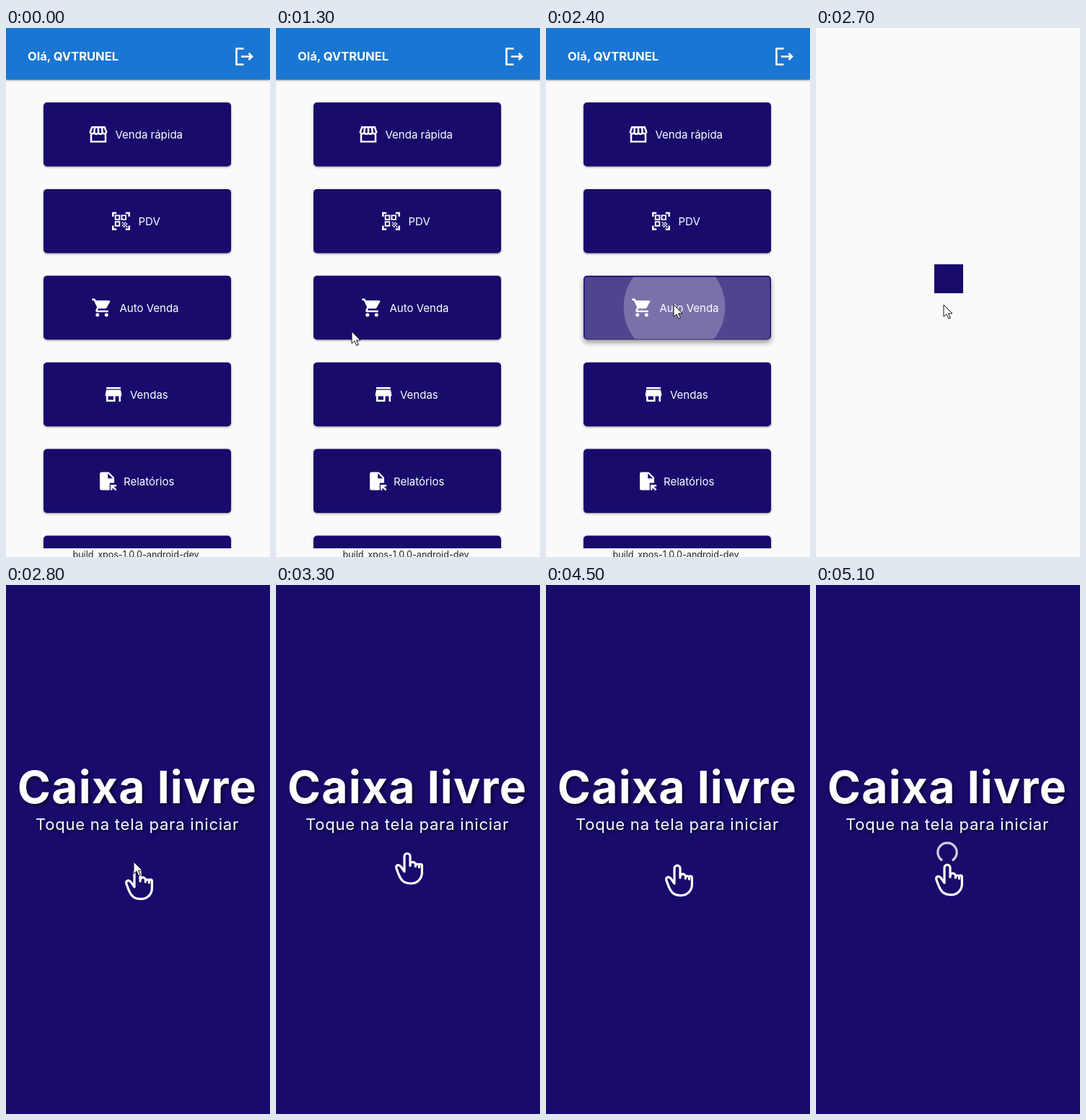
Recreate the animation shown at these times as an HTML page. Size 366 by 732 pixels, loop 5.2 s.

```html
<!DOCTYPE html>
<html lang="pt">
<head>
<meta charset="utf-8">
<title>Caixa livre</title>
<style>
  html, body { margin: 0; height: 100%; overflow: hidden; background: #fafafa; }
  svg { display: block; width: 100vw; height: 100vh; }
  text { font: 15px Inter, "Open Sans", sans-serif; fill: #fff; }
  .btn { fill: #180b6c; filter: drop-shadow(0 1.5px 1.5px #0006); }
  .icon { fill: #fff; }
  .line { fill: none; stroke: #fff; stroke-width: 2; }
  .round { stroke-linecap: round; stroke-linejoin: round; }
  .shade { filter: drop-shadow(2px 2px 2px #000a); }
</style>
</head>
<body>
<svg viewBox="0 0 366 732">
  <clipPath id="inner"><rect x="53.5" y="344.5" width="257" height="86" rx="3"/></clipPath>

  <g id="menu">
    <rect width="366" height="732" fill="#fafafa"/>
    <g id="buttons"></g>
    <g clip-path="url(#inner)" fill="#fff">
      <rect id="glow" x="52" y="343" width="260" height="89"/>
      <circle id="ripple" cx="178" cy="386" fill-opacity=".24"/>
    </g>
    <g id="labels"></g>
    <rect y="720" width="366" height="12" fill="#fafafa"/>
    <text x="180" y="733" text-anchor="middle" style="font-size:12.6px;fill:#222">build_xpos-1.0.0-android-dev</text>
    <rect width="366" height="71.5" fill="#1976d2" style="filter:drop-shadow(0 1px 1px #0006)"/>
    <text x="30" y="45" style="font-size:16.5px;font-weight:700">Olá, QVTRUNEL</text>
    <path class="line" style="stroke-width:2.6" d="M329.5 28.5H319.5V50.5H329.5M326 39.5H341M336.5 35l4.5 4.5-4.5 4.5"/>
  </g>

  <g id="splash">
    <rect width="366" height="732" fill="#fafafa"/>
    <rect x="164" y="327" width="40" height="40" fill="#180b6c"/>
  </g>

  <g id="idle">
    <rect width="366" height="732" fill="#180b6c"/>
    <g class="shade" text-anchor="middle">
      <text x="182" y="302" style="font-size:62.5px;font-weight:700;letter-spacing:1.2px">Caixa livre</text>
      <text x="182" y="339" style="font-size:22px;letter-spacing:.8px">Toque na tela para iniciar</text>
    </g>
    <path id="ring" class="line"/>
    <path id="hand" class="line round" style="stroke-width:3.2" d="M178 27V6a4 4 0 0 1 8 0V19
      M186 17.5a3.7 3.7 0 0 1 7.4 0V20M193.4 18a3 3 0 0 1 5 0V21
      M198.4 19a2 2.2 0 0 1 4 0V28C202.4 37 196 43.5 187 43.5C178 43.5 174 40 170.5 32L167 23C165.5 18 170 16.5 173 20L178 27"/>
  </g>

  <path id="cursor" d="M0 0V16.5L4 13l2.7 6.3 2.6-1.1L6.6 12H12z" fill="#fff" stroke="#111" stroke-linejoin="round"/>
</svg>

<script>
const LOOP = 5200, TAP = 1400, FIRST_TAP = 3300;
const $ = id => document.getElementById(id);
const set = (id, attrs) => { for (const k in attrs) $(id).setAttribute(k, attrs[k]); };
const show = (id, on) => { $(id).style.display = on ? '' : 'none'; };
const clamp = v => Math.max(0, Math.min(1, v));
const span = (t, a, b) => clamp((t - a) / (b - a));
const mix = (a, b, p) => a + (b - a) * p;
const smooth = p => p * p * (3 - 2 * p);

const square = (x, y, s) => `M${x} ${y}h${s}v${s}h${-s}z`;
const bits = [[0, 0], [2, 0], [1, 1], [3, 1], [0, 2], [2, 2], [1, 3], [3, 3]];
const icons = {
  shop: `<path class="line" d="M4 12V20H20V12M5 4H19L21 9.5a2.4 2.4 0 0 1-4.5.2 2.3 2.3 0 0 1-4.5 0 2.3 2.3 0 0 1-4.5 0A2.4 2.4 0 0 1 3 9.5zM8 4l-.5 5.7M12 4v5.7M16 4l.5 5.7"/>`,
  scan: `<path class="line" d="M3 7V3h4M17 3h4v4M21 17v4h-4M7 21H3v-4"/>
    <path class="line" style="stroke-width:1.5" d="${[[6, 6], [13, 6], [6, 13]].map(([x, y]) => square(x - .25, y - .25, 4.5)).join('')}"/>
    <path class="icon" d="${bits.map(([x, y]) => square(13 + x * 1.5, 13 + y * 1.5, 1.5)).join('')}"/>`,
  cart: `<path class="icon" d="M1 2v2h2l3.6 7.6-1.35 2.45C4.5 15.4 5.5 17 7 17h12v-2H7.4q-.3 0-.2-.4l.9-1.6h7.45q1.2 0 1.75-1l3.6-6.5Q21.5 4 20 4H5.2l-.95-2z"/>
    <circle class="icon" cx="7" cy="20" r="2"/><circle class="icon" cx="17" cy="20" r="2"/>`,
  store: `<path class="icon" d="M20 4H4v2h16zM21 14v-2l-1-5H4l-1 5v2h1v6h10v-6h4v6h2v-6zM12 18H6v-4h6z" fill-rule="evenodd"/>`,
  report: `<path class="icon" fill-rule="evenodd" d="M14 2H6a2 2 0 0 0-2 2v16a2 2 0 0 0 2 2h9v-8h5V8zM13 9V3.5L18.5 9z"/>
    <path class="icon" d="M16 16h6.5v2h-3l3.3 3.3-1.4 1.4L18 19.4V22h-2z"/>`
};

// label, text x, icon, icon x
const items = [
  ['Venda rápida', 151.5, 'shop', 113], ['PDV', 183.5, 'scan', 144.5],
  ['Auto Venda', 157.5, 'cart', 118], ['Vendas', 172, 'store', 134],
  ['Relatórios', 163, 'report', 125], []
];
items.forEach(([label, x, icon, iconX], i) => {
  const y = 103 + i * 119.9;
  $('buttons').innerHTML += `<rect class="btn" x="52" y="${y}" width="260" height="88.5" rx="5"/>`;
  if (label) $('labels').innerHTML +=
    `<g transform="translate(${iconX} ${y + 29.3}) scale(1.25)">${icons[icon]}</g><text x="${x}" y="${y + 50}">${label}</text>`;
});
const pressed = $('buttons').children[2];

function drawMenu(t) {
  const press = span(t, 1880, 2080), r = t < 2450 ? (t - 1890) * .138 : 105;
  set('glow', { 'fill-opacity': .24 * press });
  set('ripple', { r: Math.max(0, r) });
  pressed.style.filter = press ? `drop-shadow(0 ${1.5 + 3 * press}px ${1.5 + 2 * press}px #0006)` : '';
}

function drawCursor(t) {
  const p = smooth(span(t, 1300, 1800));
  const x = mix(105, 177, p), y = mix(420, 383, p) - 85 * p * p * (1 - p);
  set('cursor', { transform: `translate(${x} ${y})` });
}

// The hand draws back, taps upwards, and the touch point sends out a ring.
function drawTap(t) {
  const u = (t - FIRST_TAP + TAP) % TAP;
  const tip = u < 700 ? mix(370, 390, 1 - (1 - u / 700) ** 1.8)
    : u < 1010 ? mix(390, 402, smooth(span(u, 870, 1010)))
    : mix(402, 370, smooth(span(u, 1010, TAP)));
  set('hand', { transform: `translate(0 ${tip - .5})` });

  const on = t >= FIRST_TAP && u > 0 && u < 700;
  show('ring', on);
  if (!on) return;
  const w = mix(5.5, 1.6, u / 700), r = Math.max(.5, u * .037 - w / 2);
  const dx = r * Math.sin(.55), dy = r * Math.cos(.55);
  set('ring', {
    d: `M${182 - dx} ${370 + dy}A${r} ${r} 0 1 1 ${182 + dx} ${370 + dy}`,
    style: `stroke-width:${w}`,
    opacity: mix(.8, 0, span(u, 520, 700))
  });
}

function frame(now) {
  const t = Math.floor(now % LOOP / 100) * 100;
  show('menu', t < 2600);
  show('splash', t >= 2600 && t < 2800);
  show('idle', t >= 2800);
  show('cursor', t >= 1300 && t < 3000);
  drawMenu(t);
  drawCursor(t);
  drawTap(t);
  requestAnimationFrame(() => frame(performance.now() - start));
}
const start = performance.now();
frame(0);
</script>
</body>
</html>
```
